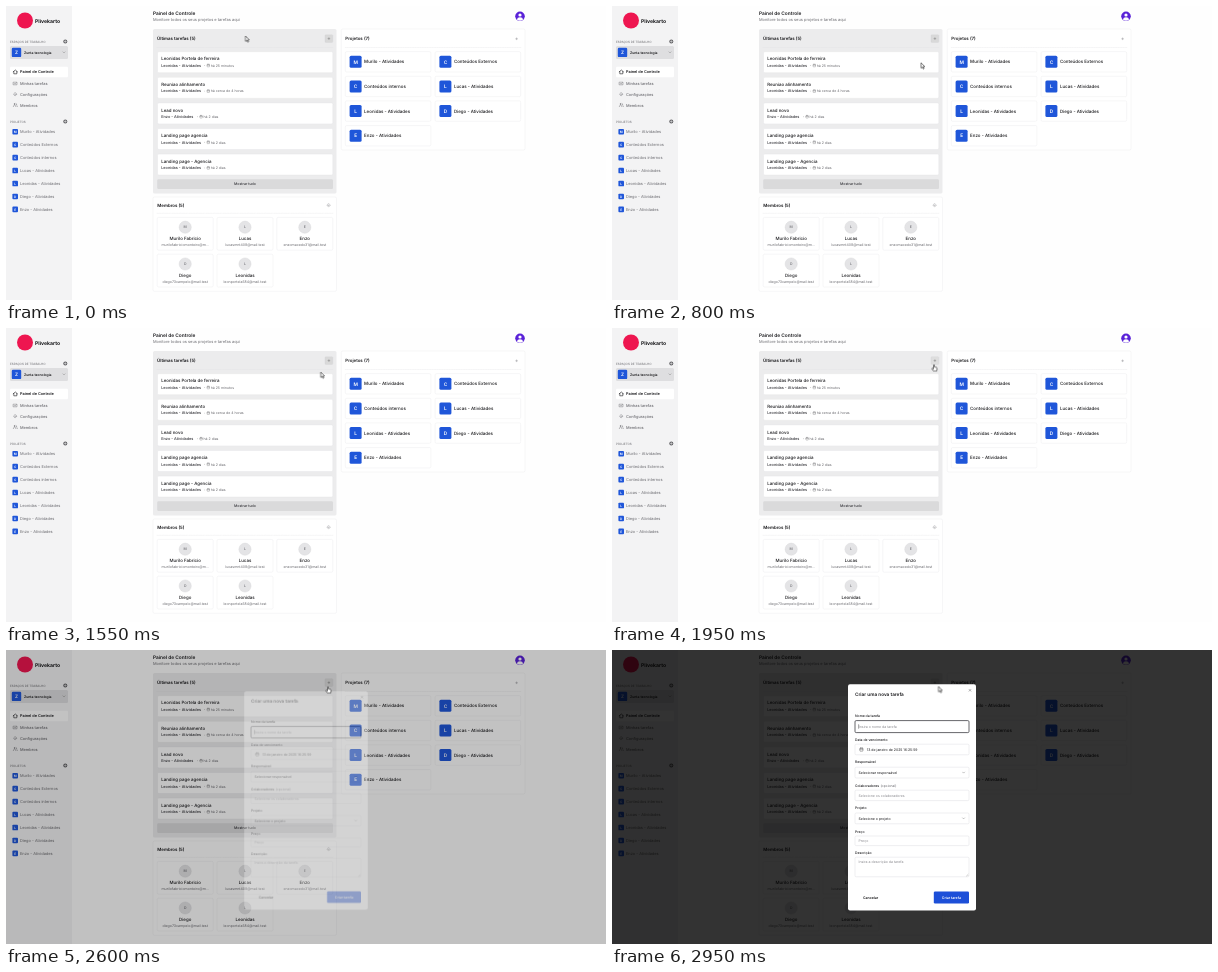
An HTML page that plays this animation: 600x294 px, repeating every 3 s.

```html
<!DOCTYPE html>
<html lang="pt">
<head>
<meta charset="utf-8">
<title>Painel de Controle</title>
<style>
  html, body { margin: 0; width: 100%; height: 100%; overflow: hidden; background: #fff; }
  svg { display: block; width: 100vw; height: 100vh; }
  text { font-family: Inter, "Liberation Sans", sans-serif; text-rendering: geometricPrecision; white-space: pre; }
  .line { fill: none; stroke-linecap: round; stroke-linejoin: round; }

  /* The small head start keeps hard changes safely before each 50 ms tick. */
  #shade, #dialog, #pointer, #arrow, #hand, #addTask { animation: 3s step-end -3ms infinite; }
  #shade { animation-name: shade; }
  #dialog { animation-name: dialog; transform-origin: 300px 147.25px; }
  #pointer { animation-name: move; }
  #arrow { animation-name: arrow; }
  #hand { animation-name: hand; }
  #addTask { animation-name: hover; }

  @keyframes shade {
    0% { opacity: 0; }
    86.667% { opacity: .3; }
    88.333% { opacity: .74; }
    90% { opacity: .925; }
    91.667%, 100% { opacity: 1; }
  }
  @keyframes dialog {
    0% { opacity: 0; transform: translateY(4.5px) scale(.95); }
    86.667% { opacity: .3; transform: translateY(3.1px) scale(.965); }
    88.333% { opacity: .74; transform: translateY(1.2px) scale(.987); }
    90% { opacity: .925; transform: translateY(.3px) scale(.996); }
    91.667%, 100% { opacity: 1; transform: none; }
  }
  @keyframes move {
    0% { transform: translate(239.5px, 30px); animation-timing-function: steps(10); }
    16.667% { transform: translate(325px, 46.5px); animation-timing-function: steps(12); }
    36.667% { transform: translate(293px, 67px); animation-timing-function: steps(12); }
    56.667%, 91.667% { transform: translate(322px, 36.5px); }
    91.667% { animation-timing-function: steps(4); }
    98.333%, 100% { transform: translate(326.5px, 36.5px); }
  }
  @keyframes arrow {
    0% { opacity: 1; }
    56.667% { opacity: 0; }
    88.333%, 100% { opacity: 1; }
  }
  @keyframes hand {
    0% { opacity: 0; }
    56.667% { opacity: 1; }
    88.333%, 100% { opacity: 0; }
  }
  @keyframes hover {
    0% { fill: #d9d9d9; }
    56.667% { fill: #dedede; }
    88.333%, 100% { fill: #d9d9d9; }
  }
</style>
</head>
<body>
<svg viewBox="0 0 600 294" preserveAspectRatio="none">
  <g id="page"></g>
  <rect id="shade" width="600" height="294" fill="#000" fill-opacity=".8"/>
  <g id="dialog"></g>
  <g id="pointer" stroke="#222" stroke-width=".6" stroke-linejoin="round" fill="#fff">
    <path id="arrow" d="M0 0V5.4L1.3 4.2L2.2 6.2L3.1 5.8L2.2 3.9H3.9Z"/>
    <path id="hand" d="M-.5 .5Q0-.3 .5 .5V2.4L2.6 3Q3.2 3.2 3.1 4L2.7 6.6H-.5L-2.2 4.3Q-2.2 3.4-1.4 3.8L-.5 4.5Z"/>
  </g>
</svg>
<script>
const BLUE = '#1f56d9', INK = '#18181b', GRAY = '#6b6b70', PALE = '#8b8b90', EDGE = '#e8e8ea';
const NS = 'http://www.w3.org/2000/svg';
let layer = document.getElementById('page');

function add(tag, attrs) {
  const el = document.createElementNS(NS, tag);
  for (const key in attrs) el.setAttribute(key, attrs[key]);
  return layer.appendChild(el);
}
const box = (x, y, width, height, fill, rx = 0, stroke = 'none', lw = .4) =>
  add('rect', { x, y, width, height, fill, rx, stroke, 'stroke-width': lw });
const dot = (cx, cy, r, fill) => add('circle', { cx, cy, r, fill });
const line = (d, stroke = INK, lw = .45) =>
  add('path', { d, stroke, 'stroke-width': lw, class: 'line' });
// y is the middle of the line of text
function text(str, x, y, size, fill = INK, weight = 400, anchor = 'start') {
  add('text', {
    x, y: y + size * .36, fill, 'font-size': size, 'font-weight': weight, 'text-anchor': anchor
  }).textContent = str;
}
const plus = (x, y, r, color = INK) => line(`M${x - r} ${y}h${2 * r}M${x} ${y - r}v${2 * r}`, color);
const chevron = (x, y) => line(`M${x - 1} ${y - .5}l1 1l1-1`, '#777');
const divider = (x, y, w) =>
  line(`M${x} ${y}h${w}`, '#dedee0', .3).setAttribute('stroke-dasharray', '.8 .9');
function gear(x, y, r, color) {
  add('circle', { cx: x, cy: y, r, fill: 'none', stroke: color, 'stroke-width': .6, 'stroke-dasharray': '.8 .3' });
  dot(x, y, r * .35, color);
}
function calendar(x, y, r, color) {
  box(x - r, y - r * .9, 2 * r, 2 * r, 'none', .3, color, .35);
  line(`M${x - r} ${y - r * .2}h${2 * r}M${x - r / 2} ${y - r * 1.2}v.5M${x + r / 2} ${y - r * 1.2}v.5`, color, .35);
}
function tile(letter, x, y, side, size, rx) {
  box(x, y - side / 2, side, side, BLUE, rx);
  text(letter, x + side / 2, y, size, '#fff', 600, 'middle');
}

const projects = ['Murilo - Atividades', 'Conteúdos Externos', 'Conteúdos internos', 'Lucas - Atividades',
  'Leonidas - Atividades', 'Diego - Atividades', 'Enzo - Atividades'];

function drawSidebar() {
  box(0, 0, 66, 294, '#f3f3f4');
  dot(19, 14.5, 8, '#ee1650');
  text('Plivekarto', 29, 15.2, 5.1, INK, 700);

  for (const [label, y] of [['ESPAÇOS DE TRABALHO', 35.5], ['PROJETOS', 115.5]]) {
    text(label, 4, y, 3, GRAY);
    dot(59.3, y, 2, '#606064');
    plus(59.3, y, 1, '#fff');
  }
  box(4, 40, 58, 13, '#dedee0', 1.5);
  tile('Z', 5.8, 46.4, 9.4, 4.6, 1.2);
  text('Zunta tecnologia', 18, 46.4, 3.4, INK, 600);
  chevron(58, 46.4);

  box(4, 60.7, 58, 10.6, '#fff', 1.3);
  line('M7.2 65.8L9.3 64L11.4 65.8M7.8 65.5V67.8H10.8V65.5', INK, .6);
  line('M7.5 76.2H11V78.8H7.5ZM8.3 77.4l.7.7l1.3-1.4', GRAY);
  gear(9.2, 88.2, 1.4, GRAY);
  line('M7.3 100.6Q7.3 99.2 8.6 99.2Q9.9 99.2 9.9 100.6M10.2 97.4Q11.4 98 10.4 99Q11.4 99.3 11.4 100.6', GRAY);
  dot(8.6, 98, .8, GRAY);
  text('Painel de Controle', 14, 66, 3.85, INK, 600);
  ['Minhas tarefas', 'Configurações', 'Membros'].forEach((s, i) =>
    text(s, 14, 77.2 + 11 * i, 3.9, GRAY, 500));
  projects.forEach((s, i) => {
    const y = 125.7 + 12.95 * i;
    tile(s[0], 6.4, y, 5.6, 3.2, .9);
    text(s, 14, y, 3.95, GRAY);
  });
}

function drawTasks() {
  box(147, 23, 183.5, 164.5, '#ececed', 1.5);
  text('Últimas tarefas (5)', 151, 32.6, 4.35, INK, 600);
  box(319, 28.7, 7.8, 7.8, '#d9d9d9', 1, '#cfcfd2', .3).id = 'addTask';
  plus(322.9, 32.6, .9, '#777');
  divider(151, 41.5, 176);
  const tasks = [
    ['Leonidas Portela de ferreira', 'Leonidas', 'há 25 minutos'],
    ['Reuniao alinhamento', 'Leonidas', 'há cerca de 4 horas'],
    ['Lead novo', 'Enzo', 'há 2 dias'],
    ['Landing page agencia', 'Leonidas', 'há 2 dias'],
    ['Landing page - Agencia', 'Leonidas', 'há 2 dias']
  ];
  tasks.forEach(([title, who, when], i) => {
    const y = 45.7 + 25.6 * i, x = who === 'Enzo' ? 191.5 : 198.7;
    box(151.5, y, 175.3, 21, '#fff', 1.4, '#e3e3e5');
    text(title, 155.2, y + 7.1, 4.43, INK, 500);
    text(who + ' - Atividades', 155.2, y + 13.8, 3.85, '#333338', 500);
    dot(x, y + 13.8, .45, '#aaa');
    calendar(x + 3.6, y + 13.8, 1.2, GRAY);
    text(when, x + 6, y + 13.8, 3.5, GRAY);
  });
  box(151.2, 173.3, 175.8, 9.8, '#dadadb', 1.3);
  text('Mostrar tudo', 239, 178.2, 3.55, '#333338', 500, 'middle');
}

function drawMembers() {
  box(147, 191, 183.5, 94.3, '#fff', 1.5, EDGE);
  text('Membros (5)', 151.3, 199.2, 4.4, INK, 600);
  gear(322.6, 199.2, 1.4, PALE);
  divider(151, 207.3, 176);
  const members = [
    ['Murilo Fabricio', 'murilofabriciomonteiro@m...'],
    ['Lucas', 'lucasmnt408@mail.test'],
    ['Enzo', 'enzomacedo31@mail.test'],
    ['Diego', 'diego73campelo@mail.test'],
    ['Leonidas', 'leonportela584@mail.test']
  ];
  members.forEach(([name, mail], i) => {
    const x = 179.2 + 59.8 * (i % 3), y = 211.4 + 36.8 * Math.floor(i / 3);
    box(x - 28, y, 56, 32.8, '#fff', 1.4, EDGE);
    add('circle', { cx: x, cy: y + 9.8, r: 6.1, fill: '#e4e4e6', stroke: '#d6d6d9', 'stroke-width': .4 });
    text(name[0], x, y + 9.8, 3.5, GRAY, 500, 'middle');
    text(name, x, y + 21.2, 4.43, INK, 500, 'middle');
    text(mail, x, y + 27.2, 3.55, GRAY, 400, 'middle');
  });
}

function drawProjects() {
  box(335.3, 23, 183.7, 121, '#fff', 1.5, EDGE);
  text('Projetos (7)', 339.3, 32.6, 4.4, INK, 600);
  plus(510.6, 32.8, .9, PALE);
  divider(339.3, 41.5, 175.5);
  projects.forEach((s, i) => {
    const x = 339.3 + 89.8 * (i % 2), y = 45.6 + 24.65 * Math.floor(i / 2);
    box(x, y, 85.6, 20.4, '#fff', 1.4, EDGE);
    tile(s[0], x + 4.3, y + 10.2, 12, 4.8, 1.5);
    text(s, x + 18.8, y + 10.2, 4.45, INK, 500);
  });
}

function drawHeader() {
  text('Painel de Controle', 147, 7.2, 4.8, INK, 600);
  text('Monitore todos os seus projetos e tarefas aqui', 147, 13.7, 3.97, GRAY);
  dot(514, 10.3, 4.8, '#5a22d8');
  dot(514, 9, 1.6, '#fff');
  add('path', { d: 'M510.9 13.6Q511.3 11.2 514 11.2Q516.7 11.2 517.1 13.6Q514 16 510.9 13.6Z', fill: '#fff' });
}

function drawDialog() {
  const edge = '#dcdcdf';
  box(236, 34.2, 128, 226.2, '#fff', 2);
  text('Criar uma nova tarefa', 243, 44.6, 4.7, INK, 600);
  line('M357.1 39.4l1.8 1.8m0-1.8l-1.8 1.8', '#555');

  // label, its y, field top, field height, field text, text y, text colour, text x
  const fields = [
    ['Nome da tarefa', 66, 70.6, 12, 'Insira o nome da tarefa', 76.5, PALE, 246.8],
    ['Data de vencimento', 89.6, 94.2, 10.6, '13 de janeiro de 2025 16:25:59', 99.5, INK, 254.8],
    ['Responsável', 111.8, 117.2, 10.8, 'Selecionar responsável', 122.6, INK, 246.6],
    ['Colaboradores', 135.6, 140.2, 10.4, 'Selecione os colaboradores', 145.5, PALE, 246.6],
    ['Projeto', 157.6, 163, 10.8, 'Selecione o projeto', 168.4, INK, 246.6],
    ['Preço', 181.6, 186, 9.6, 'Preço', 191, PALE, 246.6],
    ['Descrição', 202.6, 207.2, 19.6, 'Insira a descrição da tarefa', 212.2, PALE, 246.6]
  ];
  fields.forEach(([label, ly, top, h, value, ty, color, tx], i) => {
    text(label, 243, ly, 3.42, INK, 500);
    box(243, top, 114, h, '#fff', 1.2, i ? edge : '#3f3f46', i ? .45 : .8);
    text(value, tx, ty, 3.5, color);
  });
  text('(opcional)', 268.4, 135.6, 3.42, GRAY);
  line('M246.6 74.7v3.6', INK, .4);
  calendar(249.4, 99.5, 1.5, INK);
  chevron(351.6, 122.6);
  chevron(351.6, 168.4);
  line('M354.4 226l1.8-1.8m-.7 1.8l.7-.7', '#888', .3);

  text('Cancelar', 258.5, 247.5, 3.5, INK, 600, 'middle');
  box(321.8, 241.5, 35.2, 12, '#1d4fd8', 1.3);
  text('Criar tarefa', 339.4, 247.5, 3.5, '#fff', 600, 'middle');
}

box(0, 0, 600, 294, '#fefefe');
drawSidebar();
drawHeader();
drawTasks();
drawMembers();
drawProjects();
layer = document.getElementById('dialog');
drawDialog();
</script>
</body>
</html>
```
